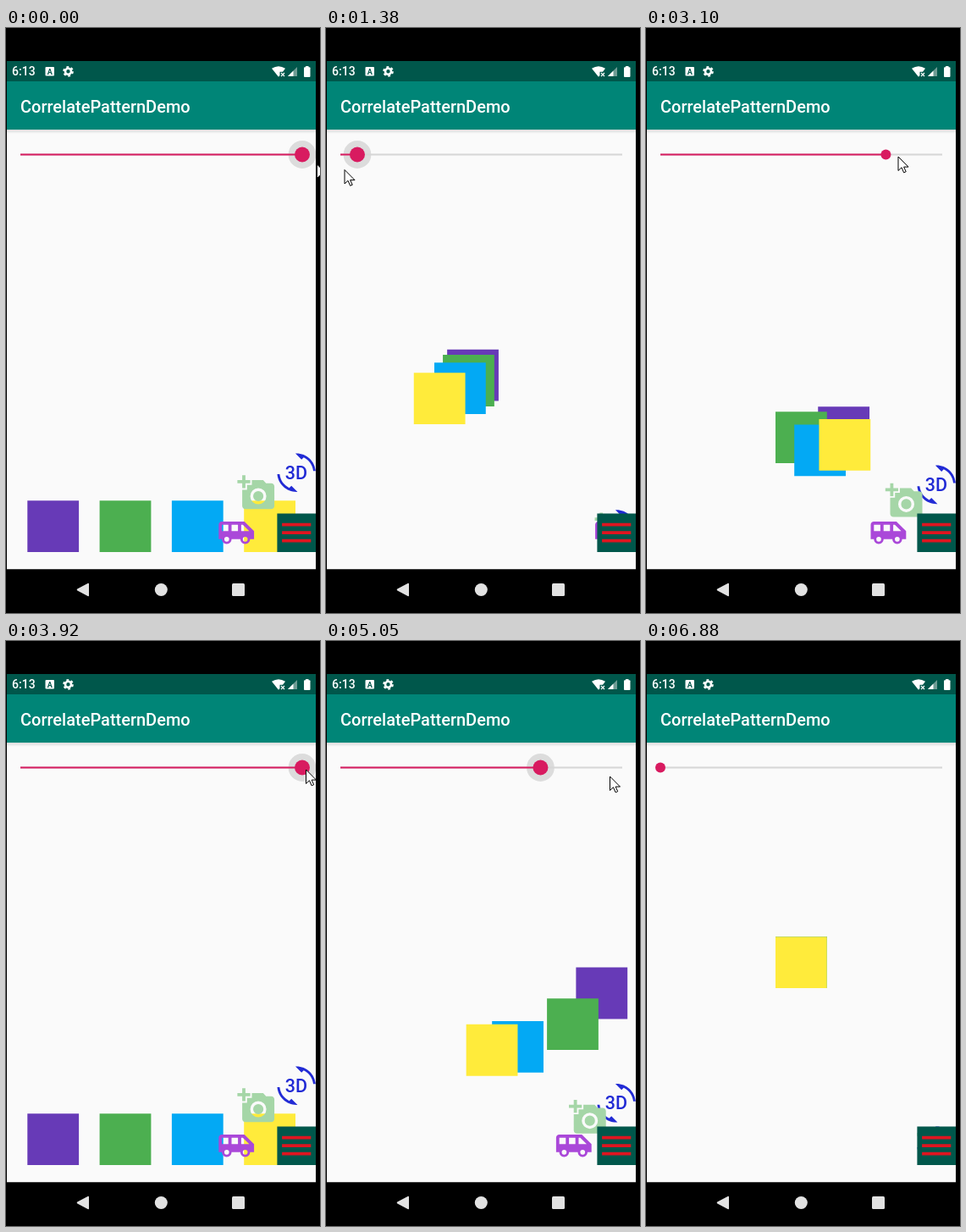
Animation of 371 by 691 pixels, one loop 7030 ms. Source, as an HTML page with a canvas:

```html
<!DOCTYPE html>
<html lang="en">
<head>
<meta charset="utf-8">
<title>Slider driven layout</title>
<style>
  html, body { margin: 0; width: 100%; height: 100%; overflow: hidden; background: #000; }
  canvas { display: block; }
</style>
</head>
<body>
<canvas id="stage" width="371" height="691"></canvas>
<script>
const ctx = document.getElementById('stage').getContext('2d');
const LOOP = 7030;
const STEP = 138;

// Drags of the slider: first and last change in ms, then the progress and pointer reached.
const initial = { progress: 1, x: 367.5, y: 161 };
const drags = [
  [300, 840, .47, 164.5, 161],
  [990, 1380, .06, 22, 167.5],
  [1500, 1500, .05, 30, 167],
  [1770, 2470, .34, 144.5, 152],
  [2590, 2830, .8, 298, 152],
  [3370, 3920, 1, 354.5, 152],
  [4070, 4350, .375, 150, 155],
  [4500, 4500, .28, 112, 156],
  [4900, 5050, .71, 335.5, 160],
  [5170, 5450, 1, 360, 163],
  [5750, 6020, .06, 34, 165],
  [6300, 6730, 0, 14, 720]
].map(([start, end, progress, x, y]) => ({ start, end, progress, x, y }));
const releases = [[1500, 1770], [3100, 3370], [6880, LOOP]];

// Every square visits the same stops; `first` and `last` are the progress at the outer ones.
const stops = [[0, 0], [-76, 62], [-152, 0], [0, -104], [152, 0], [0, 104]];
const squares = [
  { color: '#673AB7', first: .2, last: .84 },
  { color: '#4CAF50', first: .16, last: .8 },
  { color: '#03A9F4', first: .12, last: .74 },
  { color: '#FFEB3B', first: .08, last: .72 }
];
squares.forEach((square, i) => {
  square.path = [...stops, [85.3 * i - 127.7, 209]];
  square.times = [0, ...[0, 1, 2, 3].map(k => square.first + .16 * k), square.last, 1];
});

const menuIcon = new Path2D('M3 18h18v-2H3zm0-5h18v-2H3zm0-7v2h18V6z');
const vanIcon = new Path2D('M17 5H3c-1.1 0-2 .89-2 2v9h2c0 1.65 1.34 3 3 3s3-1.35 3-3h5.5c0 1.65 1.34 3 3 3s3-1.35 3-3H23v-5zM3 11V7h4v4zm3 6.5a1.5 1.5 0 1 1 0-3 1.5 1.5 0 0 1 0 3zm7-6.5H9V7h4zm4.5 6.5a1.5 1.5 0 1 1 0-3 1.5 1.5 0 0 1 0 3zM15 11V7h1l4 4z');
const cameraIcon = new Path2D('M3 4V1h2v3h3v2H5v3H3V6H0V4zm3 6V7h3V4h7l1.83 2H21c1.1 0 2 .9 2 2v12c0 1.1-.9 2-2 2H5c-1.1 0-2-.9-2-2V10zm7 9a5 5 0 1 0 0-10 5 5 0 0 0 0 10zm-3.2-5a3.2 3.2 0 1 0 6.4 0 3.2 3.2 0 0 0-6.4 0z');
const arrowsIcon = new Path2D('M7.52 21.48C4.25 19.94 1.91 16.76 1.55 13H.05C.56 19.16 5.71 24 12 24l.66-.03-3.81-3.81zM12 0l-.66.03 3.81 3.81 1.33-1.33c3.27 1.55 5.61 4.72 5.96 8.48h1.5C23.44 4.84 18.29 0 12 0z');
const pointerShape = new Path2D('M0 0V16.5l4-3.7 2.6 6 2.6-1.1-2.6-5.6h5.4z');

const mix = (a, b, k) => a + (b - a) * k;

function rect(color, x, y, w, h, radius = 0) {
  ctx.fillStyle = color;
  ctx.beginPath();
  ctx.roundRect(x, y, w, h, radius);
  ctx.fill();
}

function circle(color, x, y, r) {
  ctx.fillStyle = color;
  ctx.beginPath();
  ctx.arc(x, y, r, 0, 2 * Math.PI);
  ctx.fill();
}

function ring(x, y, r, width, dash = []) {
  ctx.lineWidth = width;
  ctx.setLineDash(dash);
  ctx.beginPath();
  ctx.arc(x, y, r, 0, 2 * Math.PI);
  ctx.stroke();
  ctx.setLineDash([]);
}

function fillPath(color, d) {
  ctx.fillStyle = color;
  ctx.fill(new Path2D(d));
}

function text(value, x, y, font, color, align = 'left') {
  ctx.font = font + ' Roboto, sans-serif';
  ctx.fillStyle = color;
  ctx.textAlign = align;
  ctx.fillText(value, x, y);
}

function icon(path, color, x, y) {
  ctx.save();
  ctx.translate(x, y);
  ctx.scale(1.9, 1.9);
  ctx.fillStyle = color;
  ctx.fill(path);
  ctx.restore();
}

// The slider reports in even steps of whole percents.
function stateAt(time) {
  const i = drags.findLastIndex(drag => drag.start <= time);
  if (i < 0) return initial;
  const from = drags[i - 1] || initial, to = drags[i];
  const steps = Math.round((to.end - to.start) / STEP);
  const done = steps ? Math.min(steps, Math.floor((time - to.start) / (to.end - to.start) * steps)) : 0;
  const k = (done + 1) / (steps + 1);
  return {
    progress: Math.round(mix(from.progress, to.progress, k) * 100) / 100,
    x: mix(from.x, to.x, k),
    y: mix(from.y, to.y, k)
  };
}

// Point on a quarter ellipse, travelled at constant speed.
function quarterArc([x0, y0], [x1, y1], vertical, fraction) {
  const count = 90, points = [], lengths = [0];
  for (let i = 0; i <= count; i++) {
    const angle = i / count * Math.PI / 2;
    const u = Math.sin(angle), v = 1 - Math.cos(angle);
    points.push([mix(x0, x1, vertical ? v : u), mix(y0, y1, vertical ? u : v)]);
    if (i) lengths.push(lengths[i - 1] + Math.hypot(points[i][0] - points[i - 1][0], points[i][1] - points[i - 1][1]));
  }
  const goal = fraction * lengths[count];
  const i = Math.max(1, lengths.findIndex(length => length >= goal));
  const k = (goal - lengths[i - 1]) / (lengths[i] - lengths[i - 1]);
  return points[i].map((end, axis) => mix(points[i - 1][axis], end, k));
}

function drawSquare({ color, times, path }, p) {
  const i = Math.max(1, times.findIndex(time => time >= p));
  const fraction = (p - times[i - 1]) / (times[i] - times[i - 1]);
  const [dx, dy] = quarterArc(path[i - 1], path[i], i % 2 === 1, fraction);
  rect(color, 153 + dx, 349.2 + dy, 60.8, 60.8);
}

function drawStatusBar() {
  rect('#00574B', 1, 39, 365, 24);
  text('6:13', 7, 56, '500 14px', '#fff');
  rect('#fff', 46.5, 46, 10.5, 10.5, 1);
  text('A', 51.8, 54.5, '700 9px', '#00574B', 'center');

  ctx.strokeStyle = '#fff';
  ring(73.5, 51.3, 3.5, 2.6);
  ring(73.5, 51.3, 5.35, 2, [2.8, 2.8]);

  fillPath('#fff', 'M314 47.8Q322 42.5 330 47.8L327 51.8H323.5V56L322 57.7z');
  ctx.lineWidth = 1.2;
  ctx.stroke(new Path2D('M325 53l4 4m0-4l-4 4'));
  fillPath('#6f9c95', 'M344 46V57H333z');
  fillPath('#fff', 'M339.5 50.5V57H333z');
  rect('#fff', 352, 46.3, 7.5, 11.7, 1);
  rect('#fff', 354, 45, 3.5, 2);
}

function drawChrome() {
  rect('#000', 0, 0, 371, 691);
  rect('#FAFAFA', 1, 120, 365, 519.3);
  drawStatusBar();
  rect('#008577', 1, 63, 365, 57);
  text('CorrelatePatternDemo', 17, 100, '500 20px', '#fff');
  const shadow = ctx.createLinearGradient(0, 120, 0, 125);
  shadow.addColorStop(0, 'rgba(0,0,0,.13)');
  shadow.addColorStop(1, 'rgba(0,0,0,0)');
  rect(shadow, 1, 120, 365, 5);

  fillPath('#E2E2E2', 'M84.3 662.6L96.6 656Q98 655.4 98 657V670.2Q98 671.8 96.6 671L84.3 664.4Q83 663.5 84.3 662.6z');
  circle('#E2E2E2', 183.3, 663.5, 7.5);
  rect('#E2E2E2', 267, 656, 15, 15, 1.5);
}

function drawSlider(p, pressed) {
  const x = 17 + 333 * p;
  if (pressed) circle('rgba(0,0,0,.12)', x, 149.5, 16.4);
  rect('#D6D6D6', 17, 148.5, 333, 2);
  rect('#D81B60', 17, 148.5, x - 17, 2);
  circle('#D81B60', x, 149.5, pressed ? 9 : 6);
}

function drawIcons(p) {
  const blue = '#222BD5', left = 320.4, top = 573.4, rise = 71 * p;
  icon(arrowsIcon, blue, left, top - rise);
  text('3D', left + 22.6, top + 30.4 - rise, '500 21.5px', blue, 'center');
  icon(cameraIcon, '#A5D6A7', left - 47 * p, top - 47 * p);
  icon(vanIcon, '#AA48D9', left - rise, top);
  rect('#00574B', left, top, 45.6, 45.6);
  icon(menuIcon, '#DF1520', left, top);
}

function drawPointer(x, y) {
  ctx.save();
  ctx.translate(x, y);
  ctx.fillStyle = '#fff';
  ctx.strokeStyle = '#000';
  ctx.lineWidth = 1;
  ctx.fill(pointerShape);
  ctx.stroke(pointerShape);
  ctx.restore();
}

function draw(time) {
  const { progress, x, y } = stateAt(time);
  const pressed = !releases.some(([from, to]) => time >= from && time < to);
  drawChrome();
  drawSlider(progress, pressed);
  squares.forEach(square => drawSquare(square, progress));
  drawIcons(progress);
  drawPointer(x, y);
}

const start = performance.now();
function tick() {
  draw((performance.now() - start) % LOOP);
  requestAnimationFrame(tick);
}
tick();
</script>
</body>
</html>
```
